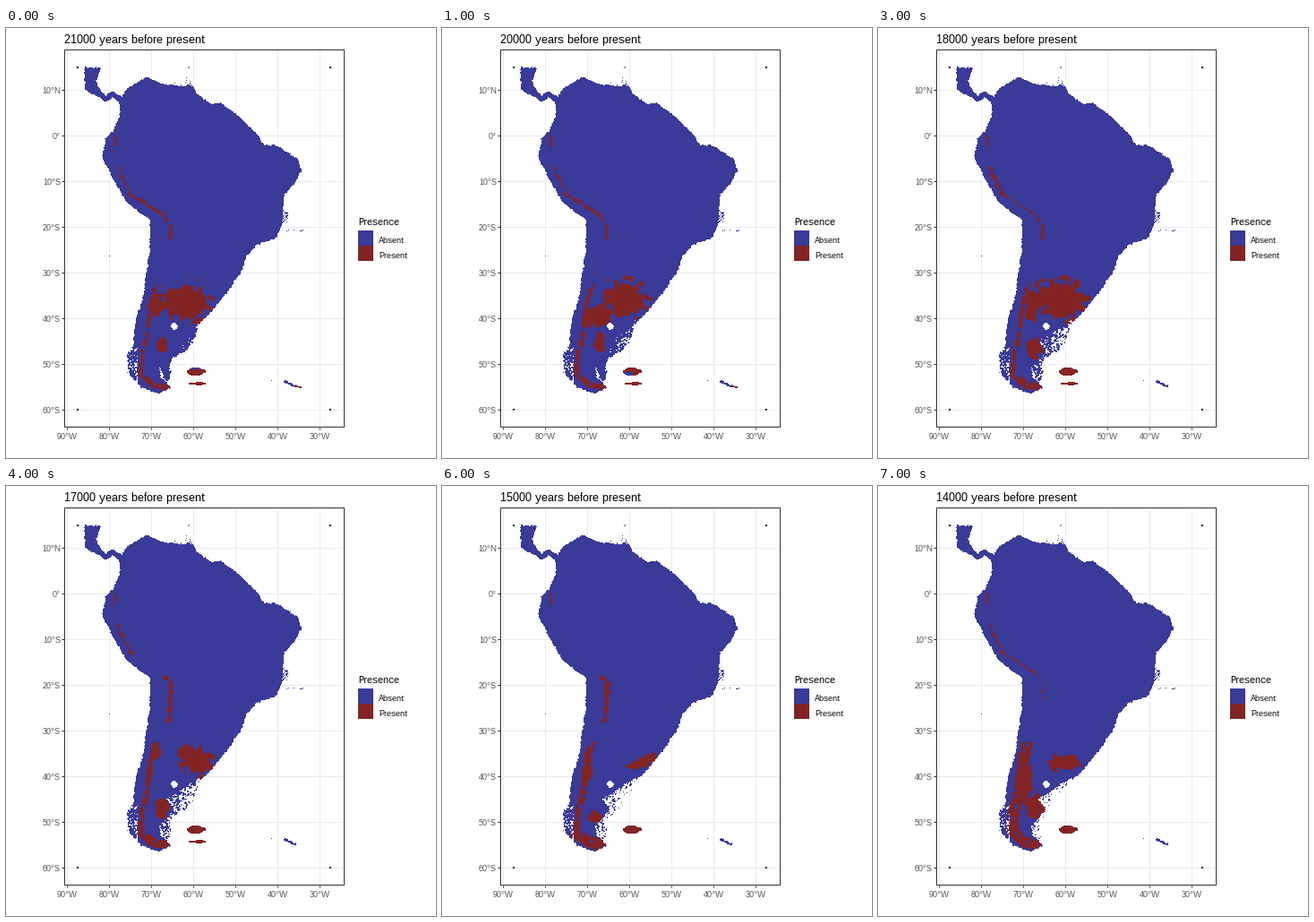
These frames come from a looping animation (480x480 px, 8 s). A matplotlib script:

```python
import numpy as np
import matplotlib.pyplot as plt
from matplotlib.animation import FuncAnimation
from matplotlib.colors import to_rgba
from matplotlib.patches import Rectangle
from matplotlib.path import Path

SIZE = 480
BLUE, RED, DARK, GRID = "#3A3A98", "#832424", "#333333", "#EBEBEB"
plt.rcParams.update({"font.family": "Liberation Sans", "text.hinting": "native",
                     "text.hinting_factor": 1})

rng = np.random.default_rng(7)
ys, xs = np.mgrid[0:SIZE, 0:SIZE] + 0.5


def noise(passes):
    """Clumpy random field, ranked to an even spread over 0..1."""
    f = rng.random((SIZE, SIZE))
    for _ in range(passes):
        f = (f + np.roll(f, 1, 0) + np.roll(f, 1, 1) + np.roll(f, (1, 1), (0, 1))) / 4
    rank = np.empty(f.size)
    rank[f.ravel().argsort()] = np.linspace(0, 1, f.size)
    return rank.reshape(f.shape)


wob_x, wob_y = noise(2) - 0.5, noise(2) - 0.5
speckle, clump, lump = noise(1), noise(4), noise(14)


def area(*points, rough=1.6):
    """Pixels inside a polygon with a ragged outline."""
    grid = np.c_[(xs + rough * wob_x).ravel(), (ys + rough * wob_y).ravel()]
    return Path(points).contains_points(grid).reshape(xs.shape)


def distance(*points, rough=2):
    """Wobbly distance of every pixel to a polyline."""
    px, py = xs + rough * wob_x, ys + rough * wob_y
    best = np.full(xs.shape, np.inf)
    for (ax, ay), (bx, by) in zip(points, points[1:]):
        dx, dy = bx - ax, by - ay
        t = np.clip(((px - ax) * dx + (py - ay) * dy) / (dx * dx + dy * dy), 0, 1)
        best = np.minimum(best, np.hypot(px - ax - t * dx, py - ay - t * dy))
    return best


def patch(cx, cy, rx, ry, slope=0, rough=0.6):
    """Lumpy ellipse, sheared by slope."""
    r = np.hypot((xs - cx) / rx, (ys - cy - slope * (xs - cx)) / ry)
    return r + rough * (lump - 0.5) < 1


def scatter(cx, cy, sx, sy, n):
    """A few single-pixel islets."""
    mask = np.zeros(xs.shape, bool)
    x = cx + sx * rng.uniform(-1, 1, n)
    y = cy + sy * rng.uniform(-1, 1, n)
    mask[y.astype(int), x.astype(int)] = True
    return mask


mainland = area(
    (129, 77), (134, 69), (143, 62), (158, 55), (171, 61), (184, 64), (208, 64), (212, 73),
    (228, 84), (240, 84), (256, 95), (276, 114), (289, 131), (301, 131), (326, 146),
    (330, 158), (325, 170), (310, 187), (309, 218), (301, 235), (280, 242), (268, 255),
    (264, 269), (250, 291), (234, 311), (223, 323), (206, 331), (187, 345), (179, 349),
    (187, 362), (171, 380), (173, 390), (185, 402), (168, 408), (150, 401), (136, 384),
    (135, 364), (142, 354), (145, 325), (153, 300), (160, 250), (161, 215), (134, 194),
    (110, 151), (108, 143), (111, 124), (120, 114), (127, 98), (127, 82))
mainland &= ~((xs < 147) & (ys > 357) & (speckle > 0.75))
isthmus = area((88, 44), (106, 44), (101, 58), (104, 68), (109, 76), (103, 77), (88, 69))
isthmus |= distance((104, 73), (111, 79), (119, 74), (128, 80), rough=1) < 3
islets = (scatter(204, 44, 0.5, 1, 2) | scatter(204, 60, 4, 6, 10) | scatter(180, 63, 10, 2, 5)
          | scatter(311, 211, 4, 6, 45) | scatter(323, 226, 10, 1, 8)
          | scatter(115, 254, 0, 0, 1) | scatter(296, 393, 0, 0, 1))
shelf = area((187, 330), (222, 322), (213, 334), (211, 346), (203, 358), (185, 370),
             (183, 378), (184, 392), (178, 394), (170, 378), (178, 350), rough=3)
offshore = xs - np.interp(ys, [330, 350, 390], [206, 180, 172])
bay = patch(188, 333, 4, 3.5)
falklands = patch(212, 383.5, 10, 4.5, rough=0.3)
bank = patch(214, 397, 11, 1.6, rough=0.3)
georgia = distance((312, 395), (323, 400), rough=1) < 1.2
georgia_tip = distance((324, 400), (329, 401), rough=0) < 0.8

# The mountain chain from the equator to the southern tip, cut into bands by height.
spine = distance((122, 120), (121, 136), (126, 160), (139, 186), (156, 196), (176, 209),
                 (184, 222), (182, 262), (167, 286), (161, 308), (158, 340), (151, 368),
                 (150, 386), (164, 398), (184, 402))
band = np.digitize(ys, [119, 138, 154, 188, 212, 237, 264, 286, 388])

KEYS = [0, 2, 3, 4, 6, 7]  # steps at which the tracks below are pinned


def presence(k):
    def at(*values):
        return np.interp(k, KEYS, values)

    widths = np.array([
        0, 2, 0,
        at(2, 2, 4, 2.5, 0, 2),
        at(3.5, 3, 1.5, 0, 0, 2),
        at(3, 2.5, 3, 4.5, 6, 1),
        at(0, 0, 0, 4, 4, 0),
        0,
        at(4, 7, 5, 6, 7, 12),
        at(6, 6, 8, 10, 13, 11)])
    chain = (spine < widths[band] / 2) & (clump < 0.88)
    pampas = patch(at(202, 207, 205, 212, 225, 208), at(306, 298, 303, 306, 308, 309),
                   at(25, 21, 28, 20, 19, 18), at(22, 20, 23, 17, 6, 9),
                   at(0.1, 0.2, 0.2, 0.35, -0.4, 0))
    west = patch(at(168, 182, 172, 167, 163, 164), at(309, 334, 308, 295, 310, 330),
                 at(10, 24, 7, 6, 4, 8), at(10, 15, 18, 9, 18, 30), at(0, -0.3, 0, 0, 0, 0))
    steppe = patch(at(174, 178, 174, 174, 171, 175), at(354, 347, 357, 360, 370, 358),
                   at(5, 6, 8, 7, 7, 10), at(10, 10, 12, 12, 8, 14))
    return chain | pampas | west | steppe


def paint(k):
    sea_level = 1.3 - 0.15 * k
    land = mainland | (shelf & (speckle < sea_level - offshore / 60))
    land &= ~bay
    red = presence(k) & land
    # The islands turn red from the top down.
    red |= falklands & ((ys > 381) if k == 0 else (ys < 384) | (xs > 213) | (k > 2))
    if k < 6:
        red |= bank
    if k < 3:
        red |= georgia_tip
    img = np.zeros((SIZE, SIZE, 4))
    img[land | isthmus | islets | falklands | georgia] = to_rgba(BLUE)
    img[red] = to_rgba(RED)
    return img


maps = [paint(k) for k in range(8)]

fig = plt.figure(figsize=(SIZE / 72, SIZE / 72), dpi=72, facecolor="white")
ax = fig.add_axes([0, 0, 1, 1])
ax.set_xlim(0, SIZE)
ax.set_ylim(SIZE, 0)
ax.axis("off")


def line(x0, y0, x1, y1, color, z):
    ax.plot([x0, x1], [y0, y1], color=color, lw=1, zorder=z, solid_capstyle="butt")


def box(x, y, w, h, color):
    ax.add_patch(Rectangle((x, y), w, h, fc=color, lw=0, zorder=4, antialiased=False))


def label(x, y, text, size, color="black", ha="left"):
    return ax.text(x, y, text, fontsize=size, color=color, ha=ha, va="baseline")


for i in range(7):
    x = 68 + 47 * i
    line(x, 25, x, 445, GRID, 1)
    line(x, 446, x, 448, DARK, 3)
    label(x, 459, f"{90 - 10 * i}°W", 9, "#4D4D4D", "center")
for i in range(8):
    y = int(69.8 + 50.9 * i)
    lat = 10 - 10 * i
    line(66, y, 377, y, GRID, 1)
    line(62, y, 65, y, DARK, 3)
    side = "N" if lat > 0 else "S" if lat < 0 else ""
    label(61, y + 4, f"{abs(lat)}°{side}", 9, "#4D4D4D", "right")
ax.add_patch(Rectangle((65, 24), 312, 421, fill=False, ec=DARK, lw=1, zorder=5))
for x in (79, 361):
    for y in (43, 425):
        box(x, y, 2, 2, "black")

label(393, 220, "Presence", 11)
for y, color, text in ((226, BLUE, "Absent"), (243, RED, "Present")):
    box(393, y, 17, 17, color)
    label(416, y + 14, text, 9)

title = label(65, 17, "", 13)
picture = ax.imshow(maps[0], extent=(0, SIZE, SIZE, 0), interpolation="nearest",
                    aspect="auto", zorder=2)


def update(k):
    picture.set_data(maps[k])
    title.set_text(f"{21000 - 1000 * k} years before present")
    return picture, title


anim = FuncAnimation(fig, update, frames=8, interval=1000, repeat=True, repeat_delay=0)
plt.show()
```
